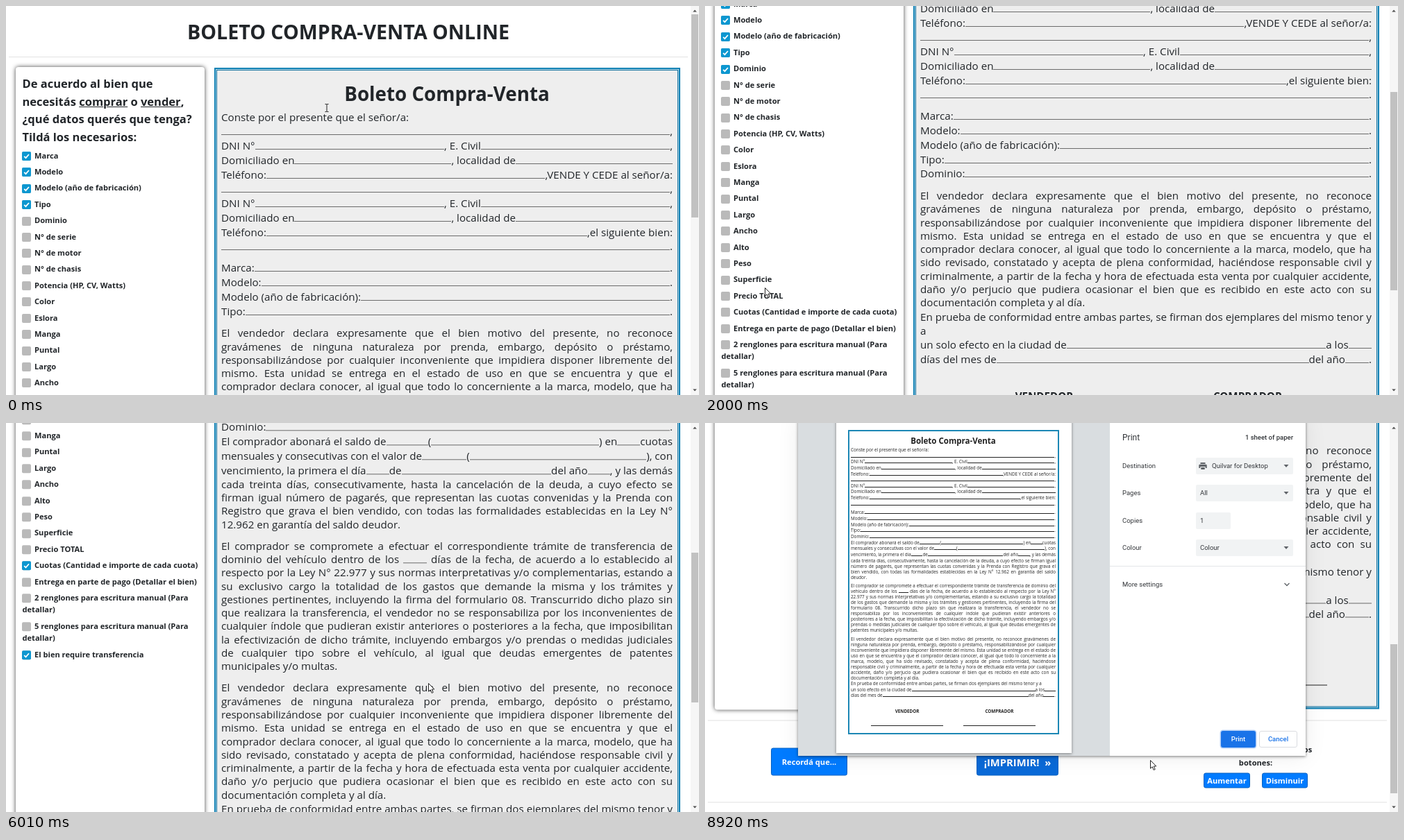
Recreate the animation shown at these times as an HTML page. Size 998 px wide and 561 px high, loop 9000 ms.

```html
<!DOCTYPE html>
<html lang="es">
<head>
<meta charset="utf-8">
<title>Boleto Compra-Venta</title>
<style>
html, body { margin: 0; width: 100%; height: 100%; overflow: hidden; background: #fff; }
body { font-family: "Open Sans", "Noto Sans", sans-serif; color: #212529; }
#stage { position: relative; width: 998px; height: 561px; overflow: hidden; background: #fff; }
#stage * { box-sizing: border-box; }
h1, h2, h3, p { margin: 0; }

#page { position: absolute; left: 0; top: 0; width: 986px; animation: scroll 9s linear infinite; }
h1 { height: 73px; padding-top: 17px; font-size: 28.6px; line-height: 40px; text-align: center; white-space: nowrap; }
.rule { margin: 0 4px; border-top: 1px solid #e2e2e2; }
.cols { display: flex; margin-top: 14px; padding-left: 14px; }

.side { width: 272px; margin-right: 14px; padding: 11.2px 0 0 9.5px; border-radius: 4px; box-shadow: 0 0 6px #444; white-space: nowrap; }
.side h3 { margin-bottom: 5.5px; font-size: 16.5px; line-height: 25.5px; }
.item { position: relative; margin-bottom: 5.9px; font: bold 11.1px/17.5px "Open Sans", "Noto Sans", sans-serif; text-indent: 17.5px; }
.box, .tick { position: absolute; left: -.5px; top: 3.25px; width: 13px; height: 13px; border-radius: 2px; background: #bababa; }
.tick { left: 0; top: 0; background: #0c97d0; }
.tick svg { position: absolute; left: 0; top: 0; }

.doc { font-size: 15.17px; line-height: 1.27em; white-space: nowrap; }
.doc.main { width: 671px; margin: 1px 0; padding: 1.15em 9px 2.11em 8px; border: 2px solid #0f80b3; background: #eee;
  box-shadow: inset 0 0 0 1px #b9dcec, inset 0 0 0 2px #0f6f9e; }
.doc h2 { margin-bottom: .185em; font-size: 1.83em; line-height: 1.3em; text-align: center; }
.row { display: flex; align-items: baseline; height: 1.368em; line-height: 1.368em; white-space: pre; }
.row i, .gap { border-bottom: 1px solid #6b6b6b; }
.gap { display: inline-block; width: 2.2em; }
.break { height: .68em; }
.para { padding-top: .785em; }
.para div:not(:last-child), .end div:not(:last-child) { height: 1.27em; text-align-last: justify; }
.end div, .end + .row, .end + .row + .row { height: 1.351em !important; line-height: 1.351em; }
.fold { overflow: hidden; }
.signs { display: flex; justify-content: space-evenly; margin-top: 2.31em; font-weight: bold; line-height: 1.31em; text-align: center; }
.signs div { width: 35.2%; padding-bottom: 2.48em; border-bottom: 1px solid #222; }

.tools { position: relative; height: 119px; margin: 15px 4px 0; border: solid #e2e2e2; border-width: 1px 0; font-size: 11.15px; font-weight: bold; }
.tools > * { position: absolute; }
.btn { display: flex; align-items: center; justify-content: center; border: 1px solid #0a62c0; border-radius: 3px; background: #007bff; color: #fff; white-space: pre; }
.black { height: 34px; margin-top: 15px; background: #000; }

#bar { position: absolute; left: 986px; top: 0; width: 12px; height: 561px; background: #f6f6f6; }
#bar svg { position: absolute; left: 0; top: 0; }
#thumb { position: absolute; left: 1px; width: 10px; background: #c1c1c1; animation: thumb 9s linear infinite; }

#dialog { position: absolute; left: 134px; top: -8px; width: 731px; height: 488px; background: #fff;
  box-shadow: 0 1px 4px rgba(0,0,0,.5), 0 1px 30px rgba(0,0,0,.08); font: 9.5px/12px Roboto, "Noto Sans", sans-serif; color: #33363a; }
#dialog div, #dialog svg { position: absolute; }
#left { left: 0; top: 0; width: 449px; height: 488px; overflow: hidden; background: #d9dde0; }
#sheet { left: 55px; top: 0; width: 339px; height: 484px; background: #fff; box-shadow: 0 1px 4px rgba(0,0,0,.45); }
#sheet .doc { left: 17px; top: 18px; width: 304px; padding: .95em 3px 1.6em 2px; border: 2px solid #1c87b5; font-family: "Open Sans", "Noto Sans", sans-serif; font-size: 6.3px; line-height: 1.27em; color: #222; }
#sheet .doc div { position: static; }
#sheet .row i, #sheet .gap { border-color: #222; }
#panel { left: 449px; top: 8px; width: 282px; height: 480px; white-space: nowrap; }
#panel .field { left: 124px; height: 24px; padding: 6px; border-radius: 2px; background: #f1f3f4; }
#panel .act { height: 24px; top: 444px; border-radius: 3px; text-align: center; line-height: 24px; font-weight: 500; }

#cursor { position: absolute; left: 0; top: 0; animation: move 9s ease-in-out infinite; }
#cursor svg { position: absolute; overflow: visible; left: 0; top: 0; width: 1px; height: 1px; fill: #fff; stroke: #222; }

.show { animation: 9s step-end infinite; }
.doc.main .dom { animation: open1 9s step-end infinite; }
.doc.main .quota { animation: open2 9s step-end infinite; }
.doc.main .transfer { animation: open3 9s step-end infinite; }
@keyframes open1 { 0% { max-height: 0 } 9.8%, to { max-height: 30em } }
@keyframes open2 { 0% { max-height: 0 } 44.6%, to { max-height: 30em } }
@keyframes open3 { 0% { max-height: 0 } 61.6%, to { max-height: 30em } }
@keyframes check1 { 0% { visibility: hidden } 9.2%, to { visibility: visible } }
@keyframes check2 { 0% { visibility: hidden } 37.8%, to { visibility: visible } }
@keyframes check3 { 0% { visibility: hidden } 59.7%, to { visibility: visible } }
@keyframes dialog { 0% { visibility: hidden } 78.6%, to { visibility: visible } }
@keyframes panel { 0% { visibility: hidden } 83%, to { visibility: visible } }
@keyframes sheet { 0% { visibility: hidden } 88.9%, to { visibility: visible } }
@keyframes beam { 0% { visibility: visible } 2.6%, to { visibility: hidden } }
@keyframes arrow { 0% { visibility: hidden } 2.6% { visibility: visible } 75.6% { visibility: hidden } 83.4%, to { visibility: visible } }
@keyframes hand { 0% { visibility: hidden } 75.6% { visibility: visible } 83.4%, to { visibility: hidden } }
@keyframes hover { 0% { background: #007bff } 75.6%, to { background: #0a6ad8 } }
@keyframes scroll {
  0%, 13.3% { transform: translateY(0) }
  16.1% { transform: translateY(-146px) }
  18.3%, 47.2% { transform: translateY(-219px) }
  50.78% { transform: translateY(-324px) }
  53.5%, 66.2% { transform: translateY(-438px) }
  66.78% { transform: translateY(-454px) }
  71.1%, 83% { transform: translateY(-804px) }
  83.01%, to { transform: translateY(-797.5px) }
}
@keyframes thumb {
  0%, 9.79% { top: 12px; height: 292.5px }
  9.8%, 13.3% { top: 12px; height: 286.6px }
  16.1% { top: 86.6px; height: 286.6px }
  18.3%, 44.59% { top: 123.5px; height: 286.6px }
  44.6%, 47.2% { top: 110.6px; height: 252.5px }
  50.78% { top: 157.8px; height: 252.5px }
  53.5%, 61.59% { top: 209.2px; height: 252.5px }
  61.6%, 66.2% { top: 180.5px; height: 215.8px }
  66.78% { top: 186.6px; height: 215.8px }
  71.1%, 83% { top: 321.3px; height: 215.8px }
  83.01%, to { top: 318.5px; height: 215.8px }
}
@keyframes move {
  0%, .89% { transform: translate(462px, 147px) }
  5.33%, 7.2% { transform: translate(27px, 292px) }
  8.9% { transform: translate(28px, 307px) }
  11.4%, 17.2% { transform: translate(28px, 310px) }
  22.2%, 24% { transform: translate(86px, 406px) }
  26.8%, 32.3% { transform: translate(29px, 461px) }
  34.1%, 47% { transform: translate(28px, 444px) }
  50.2%, 51.5% { transform: translate(38px, 467px) }
  54.5%, 55.3% { transform: translate(28px, 383px) }
  58%, 62% { transform: translate(26px, 356px) }
  66.2%, 71.9% { transform: translate(608px, 375px) }
  76.1%, 88.8% { transform: translate(474px, 488px) }
  98.2%, 99% { transform: translate(560px, 486px) }
  99.05%, to { transform: translate(641px, 486px) }
}
</style>
</head>
<body>
<div id="stage">
  <div id="page">
    <h1>BOLETO COMPRA-VENTA ONLINE</h1>
    <div class="rule"></div>
    <div class="cols">
      <div class="side">
        <h3>De acuerdo al bien que<br>necesitás <u>comprar</u> o <u>vender</u>,<br>¿qué datos querés que tenga?<br>Tildá los necesarios:</h3>
        <div id="items"></div>
      </div>
      <div class="doc main"></div>
    </div>
    <div class="tools">
      <div class="btn" style="left:91px;top:38.5px;width:110px;height:40px">Recordá que...</div>
      <div class="btn" style="left:387px;top:38.5px;width:118px;height:40px;font-size:14.8px;animation:hover 9s step-end infinite">¡IMPRIMIR!  »</div>
      <p style="left:689px;top:32px;width:200px;text-align:center;line-height:18.4px">Modificá el tamaño con estos<br>botones:</p>
      <div class="btn" style="left:714px;top:74.5px;width:67px;height:22px">Aumentar</div>
      <div class="btn" style="left:798px;top:74.5px;width:66px;height:22px">Disminuir</div>
    </div>
    <div class="black"></div>
  </div>

  <div id="bar">
    <svg width="12" height="561" fill="#505050"><path d="M3.2 8.5L6 5.5L8.8 8.5ZM3.2 552.5L6 555.5L8.8 552.5Z"/></svg>
    <div id="thumb"></div>
  </div>

  <div id="dialog" class="show" style="animation-name:dialog">
    <div id="left">
      <div id="sheet" class="show" style="animation-name:sheet"><div class="doc"></div></div>
    </div>
    <div id="panel" class="show" style="animation-name:panel">
      <div style="left:18px;top:14px;font-size:12px;line-height:14px">Print</div>
      <div style="right:18px;top:15px;font-weight:500">1 sheet of paper</div>
      <div style="left:0;top:206px;width:282px;height:1px;background:#e3e5e8"></div>
      <div style="left:18px;top:227px">More settings</div>
      <svg style="left:250px;top:229px" width="10" height="8" fill="none" stroke="#5f6368" stroke-width="1.3"><path d="M1.5 2L5 5.5L8.5 2"/></svg>
      <div class="act" style="left:160px;width:50px;background:#1a73e8;color:#fff;box-shadow:0 0 0 1.5px #b5d0f7">Print</div>
      <div class="act" style="left:215px;width:55px;border:1px solid #dadce0;color:#1a73e8;line-height:22px">Cancel</div>
    </div>
  </div>

  <div id="cursor">
    <svg class="show" style="animation-name:beam"><path fill="none" d="M-2.5 -5.5H-.7L0 -5L.7 -5.5H2.5M0 -5V5M-2.5 5.5H-.7L0 5L.7 5.5H2.5"/></svg>
    <svg class="show" style="animation-name:arrow"><path d="M.5 .5V12.2L3.2 9.8L5.2 14.4L7.2 13.5L5.2 9H8.8Z"/></svg>
    <svg class="show" style="animation-name:hand"><path d="M-1 1Q0 -.6 1.2 1V6.2Q2.4 5.2 3.4 6.5Q4.6 5.7 5.5 7Q7.4 6.6 7.5 8.5V11.5L6 16.3H-.2L-3.6 10.8Q-4.2 8.8 -2.6 9.3L-1 11Z"/></svg>
  </div>
</div>
<script>
const $ = s => document.querySelector(s);

// "_n" is a blank to fill in, n its share of the free width
const row = s => `<div class="row">${s.replace(/_(\d+)/g, '<i style="flex:$1"></i>')}</div>`;

const party = end => ['_1,', 'DNI N°_1, E. Civil_1,', 'Domiciliado en_1, localidad de_1', 'Teléfono:_1' + end];

// line ends: | wide layout, ^ print layout, # both
const quota = 'cada treinta días, consecutivamente, hasta la cancelación de la deuda, a cuyo efecto se|firman igual^número de pagarés, que representan las cuotas convenidas y la Prenda con|Registro que grava el^bien vendido, con todas las formalidades establecidas en la Ley N°|12.962 en garantía del saldo^deudor.';
const transfer = 'El comprador se compromete a efectuar el correspondiente trámite de transferencia de|dominio del^vehículo dentro de los _ días de la fecha, de acuerdo a lo establecido al|respecto por la Ley N°^22.977 y sus normas interpretativas y/o complementarias, estando a|su exclusivo cargo la totalidad^de los gastos que demande la misma y los trámites y|gestiones pertinentes, incluyendo la firma del^formulario 08. Transcurrido dicho plazo sin|que realizara la transferencia, el vendedor no se^responsabiliza por los inconvenientes de|cualquier índole que pudieran existir anteriores o^posteriores a la fecha, que imposibilitan|la efectivización de dicho trámite, incluyendo embargos y/o^prendas o medidas judiciales|de cualquier tipo sobre el vehículo, al igual que deudas emergentes de^patentes|municipales y/o multas.';
const seller = 'El vendedor declara expresamente que el bien motivo del presente, no reconoce|gravámenes de^ninguna naturaleza por prenda, embargo, depósito o préstamo,|responsabilizándose por cualquier^inconveniente que impidiera disponer libremente del|mismo. Esta unidad se entrega en el estado de^uso en que se encuentra y que el|comprador declara conocer, al igual que todo lo concerniente a la^marca, modelo, que ha|sido revisado, constatado y acepta de plena conformidad, haciéndose^responsable civil y|criminalmente, a partir de la fecha y hora de efectuada esta venta por cualquier^accidente,|daño y/o perjucio que pudiera ocasionar el bien que es recibido en este acto con su#documentación completa y al día.';
const closing = 'En prueba de conformidad entre ambas partes, se firman dos ejemplares del mismo tenor y|a';

function contract(brk) {
  const lines = s => s.split(new RegExp(`[#${brk}]`))
    .map(l => `<div>${l.replace(/[|^]/g, ' ').replace('_', '<span class="gap"></span>')}</div>`).join('');
  const rows = list => list.map(row).join('');
  return `<h2>Boleto Compra-Venta</h2>
    ${rows(['Conste por el presente que el señor/a:', ...party(',VENDE Y CEDE al señor/a:'), ...party(',el siguiente bien:'), '_1.'])}
    <div class="break"></div>
    ${rows(['Marca', 'Modelo', 'Modelo (año de fabricación)', 'Tipo'].map(n => n + ':_1.'))}
    <div class="fold dom">${row('Dominio:_1.')}</div>
    <div class="fold quota">${rows([
      'El comprador abonará el saldo de_60(_241) en_33cuotas',
      'mensuales y consecutivas con el valor de_64(_254), con',
      'vencimiento, la primera el día_33de_214del año_32, y las demás'])}
      <div class="para" style="padding-top:.03em">${lines(quota)}</div></div>
    <div class="fold transfer"><div class="para">${lines(transfer)}</div></div>
    <div class="para">${lines(seller)}</div>
    <div class="end">${lines(closing)}</div>
    ${row('un solo efecto en la ciudad de_371a los_33')}${row('días del mes de_450del año_34.')}
    <div class="signs"><div>VENDEDOR</div><div>COMPRADOR</div></div>`;
}
$('.doc.main').innerHTML = contract('|');
$('#sheet .doc').innerHTML = contract('^');

const names = ['Marca', 'Modelo', 'Modelo (año de fabricación)', 'Tipo', 'Dominio', 'N° de serie', 'N° de motor', 'N° de chasis',
  'Potencia (HP, CV, Watts)', 'Color', 'Eslora', 'Manga', 'Puntal', 'Largo', 'Ancho', 'Alto', 'Peso', 'Superficie', 'Precio TOTAL',
  'Cuotas (Cantidad e importe de cada cuota)', 'Entrega en parte de pago (Detallar el bien)',
  '2 renglones para escritura manual (Para<br>detallar)', '5 renglones para escritura manual (Para<br>detallar)', 'El bien require transferencia'];
const checks = { 4: 'check1', 19: 'check2', 23: 'check3' };
const tick = anim => `<span class="tick show" style="animation-name:${anim}"><svg width="13" height="13" fill="none" stroke="#fff" stroke-width="1.8"><path d="M3.2 6.8L5.5 9.2L10 4"/></svg></span>`;
$('#items').innerHTML = names.map((n, i) =>
  `<div class="item"><span class="box">${i < 4 ? tick('none') : checks[i] ? tick(checks[i]) : ''}</span>${n}</div>`).join('');

const field = (label, value, y, w = 140, pad = 6) => `<div style="left:18px;top:${y - 6}px">${label}</div>
  <div class="field" style="top:${y - 12}px;width:${w}px;padding-left:${pad}px">${value}</div>` +
  (w > 99 ? `<svg style="left:250px;top:${y - 2}px" width="8" height="5" fill="#5f6368"><path d="M.5 0H7.5L4 4Z"/></svg>` : '');
$('#panel').insertAdjacentHTML('beforeend',
  field('Destination', 'Quilvar for Desktop', 62, 140, 23) + field('Pages', 'All', 101) +
  field('Copies', '1', 141, 50) + field('Colour', 'Colour', 180) +
  '<svg style="left:128px;top:56px" width="12" height="12" fill="#5f6368"><path d="M2.5 1H9.5V3H2.5ZM1.5 3.8H10.5Q11.7 3.8 11.7 5V9H9.7V7H2.3V9H.3V5Q.3 3.8 1.5 3.8ZM3.3 8H8.7V11H3.3Z"/></svg>');
</script>
</body>
</html>
```
